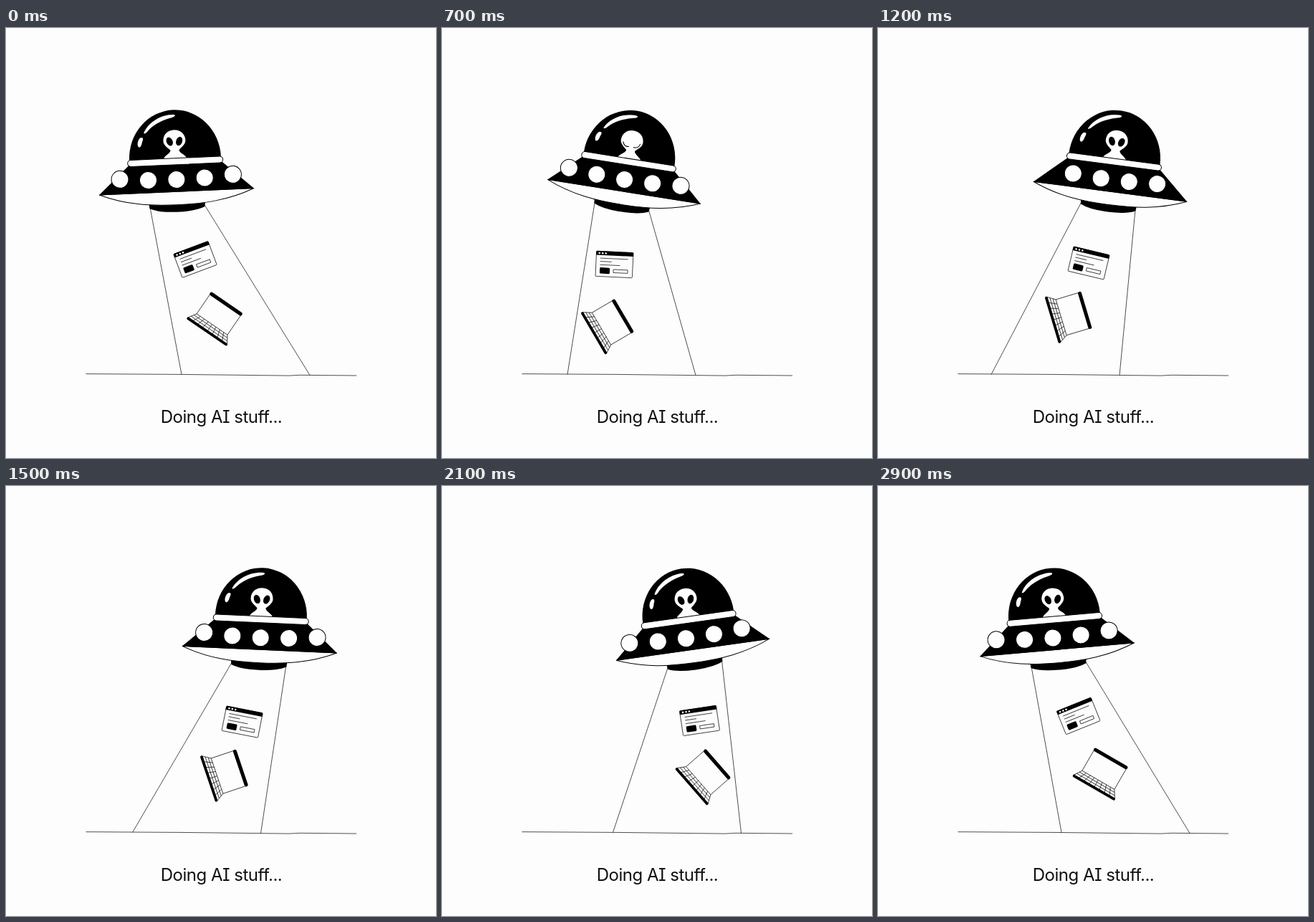
Animation, 600 px wide and 600 px high, one loop 3 s. Source, as an HTML page:

```html
<!DOCTYPE html>
<html lang="en">
<head>
<meta charset="utf-8">
<title>Doing AI stuff</title>
<style>
  html, body { margin: 0; width: 100%; height: 100%; overflow: hidden; background: #fefdfe; }
  svg { display: block; width: 100vw; height: 100vh; }
  .thin { fill: none; stroke: #222; stroke-width: .8; }
  .paper { fill: #fefefe; stroke: #000; }
  .white { fill: #fefefe; }
  .thick { stroke: #000; stroke-linecap: round; }
  text { font: 24px Inter, "Open Sans", sans-serif; font-feature-settings: "cv08"; letter-spacing: -.5px; fill: #111; }
</style>
</head>
<body>
<svg viewBox="0 0 600 600">
  <path class="thin" d="M111.5 482.6L245 483.4 395 485.1 410 484.3 489 485"/>
  <path id="beam" class="thin"/>

  <g id="page">
    <rect class="thin" x="-25.7" y="-17.5" width="51.4" height="35" rx="1"/>
    <path d="M-26-12.3V-16.5Q-26-18-24.5-18H24.5Q26-18 26-16.5V-12.3Z"/>
    <g class="white">
      <circle cx="-21.5" cy="-15" r="1.3"/>
      <circle cx="-17" cy="-15" r="1.3"/>
      <circle cx="-12.5" cy="-15" r="1.3"/>
    </g>
    <path class="thin" d="M-20-8H19M-20-3.5H-4M-20 1.2H8"/>
    <rect x="-20" y="5" width="14" height="8.5" rx="1.5"/>
    <rect class="thin" x="-1" y="7" width="20" height="4.5"/>
  </g>

  <g id="laptop">
    <path class="thin" d="M-26-23V11.5H26V-23"/>
    <path id="keys" class="thin"/>
    <path class="thick" stroke-width="5" d="M-24.5-23H24.5"/>
    <path class="thick" stroke-width="3.8" d="M-32 23.5H32"/>
  </g>

  <g id="ufo">
    <path d="M-39.5 14L-38.5 22.5Q-26 28.5 0 28.5T38.5 22.5L39.5 14Z"/>
    <path class="paper" d="M-108 0C-70 16-35 18.5 0 18.5S70 16 108 0Z"/>
    <path d="M-64-40L-108.5 .5H108.5L64-40Z"/>
    <path d="M-64-42V-46A64 68 0 0 1 64-46V-42Z"/>
    <g class="white">
      <path d="M-42-84C-35-98-18-108 0-107.5 5-106.5 2-104-4-103-20-99-30-93-37-85.5-39.5-82.5-43-82-42-84Z"/>
      <path d="M-47-77C-43-78-43-75-45-71-46-66-48-63-50-64-53-66-51-75-47-77Z"/>
      <path d="M0-86C10-86 15.5-79 15.5-71 15.5-65 9-61 6-58 6-53 16-51 17-44H-17C-16-51-6-53-6-58-9-61-15.5-65-15.5-71-15.5-79-10-86 0-86Z"/>
    </g>
    <g id="open">
      <ellipse rx="4.3" ry="6.3" transform="translate(-6.7 -70) rotate(-22)"/>
      <ellipse rx="4.3" ry="6.3" transform="translate(6.7 -70) rotate(22)"/>
    </g>
    <path id="shut" fill="none" stroke="#000" d="M-12-69Q-11-62-3-63M12-69Q11-62 3-63"/>
    <rect class="paper" x="-66.5" y="-46.5" width="133" height="9" rx="4.5"/>
    <g id="lights" class="paper"></g>
  </g>

  <text x="300.5" y="551" text-anchor="middle">Doing AI stuff...</text>
</svg>
<script>
const LOOP = 3000, STEP = 100, GAP = 39.4;
const $ = id => document.getElementById(id);

// time, ufo x, ufo tilt, beam x, page x, y, angle, laptop x, y, angle
const poses = [
  [0, 238, -2.5, 245, 264, 323, -20.5, 294, 404, 34.4],
  [350, 225, 4.3, 210, 237.5, 327, -10.8, 251, 410, 45.5],
  [700, 254, 9, 175, 240.5, 330, 2.7, 232.4, 413.8, 59.6],
  [1200, 324, 7.45, 158, 294, 328, 13.4, 266.6, 400.5, 73.3],
  [1700, 365, -1.2, 195, 349, 329.7, 6.8, 331.5, 402.4, 66.8],
  [2100, 350, -8, 238.5, 359.5, 327.5, -8.5, 366.4, 403.6, 48.8],
  [2500, 302, -9.8, 266.5, 330.4, 321.5, -20.3, 358.9, 398.3, 32.6],
  [2900, 250, -5, 256, 279.7, 321, -22, 313.1, 400.3, 30.1]
];

function poseAt(index) {
  const n = poses.length, turn = Math.floor(index / n);
  const [time, ...rest] = poses[index - turn * n];
  return [time + turn * LOOP, ...rest];
}

// Smooth periodic curve through the poses
function sample(t) {
  const i = poses.findLastIndex(p => p[0] <= t);
  const [a, b, c, d] = [-1, 0, 1, 2].map(k => poseAt(i + k));
  const span = c[0] - b[0], u = (t - b[0]) / span, v = 1 - u;
  return b.map((from, k) => {
    const slopeB = (c[k] - a[k]) / (c[0] - a[0]);
    const slopeC = (d[k] - b[k]) / (d[0] - b[0]);
    return from * v * v * (1 + 2 * u) + c[k] * u * u * (3 - 2 * u)
      + span * u * v * (slopeB * v - slopeC * u);
  });
}

function place(id, x, y, angle) {
  $(id).setAttribute("transform", `translate(${x} ${y}) rotate(${angle})`);
}

function local(x, y, ox, oy, angle) {
  const r = angle * Math.PI / 180, c = Math.cos(r), s = Math.sin(r);
  return `${ox + x * c - y * s} ${oy + x * s + y * c}`;
}

let keys = "M-26 11.5L-33 22.5H33L26 11.5M-28.2 15H28.2M-30.5 18.7H30.5";
for (let i = 1; i < 8; i++) keys += `M${-26 + 6.5 * i} 11.5L${-33 + 8.25 * i} 22.5`;
$("keys").setAttribute("d", keys);
$("lights").innerHTML = '<circle r="12"/>'.repeat(6);

function draw(t) {
  const [, x, tilt, beam, px, py, pa, lx, ly, la] = sample(t);
  place("ufo", x, 228.2, tilt);
  place("page", px, py, pa);
  place("laptop", lx, ly, la);
  $("beam").setAttribute("d",
    `M${local(-38, 20, x, 228.2, tilt)}L${beam} 483.4M${local(38, 20, x, 228.2, tilt)}L${beam + 179} 484.5`);

  const shift = (.6 + t * 4 * GAP / LOOP) % GAP;
  [...$("lights").children].forEach((light, i) => {
    const cx = shift + (i - 3) * GAP;
    light.setAttribute("cx", cx);
    light.setAttribute("cy", -16.6 - .0006 * cx * cx);
    light.style.display = Math.abs(cx) < 88 ? "" : "none";
  });

  const blink = t === 700;
  $("open").style.display = blink ? "none" : "";
  $("shut").style.display = blink ? "" : "none";
}

function tick() {
  let t = Math.floor(performance.now() % LOOP / STEP) * STEP;
  if (t === 1300 || t === 2600) t -= STEP; // two poses are held twice as long
  draw(t);
  requestAnimationFrame(tick);
}
tick();
</script>
</body>
</html>
```
